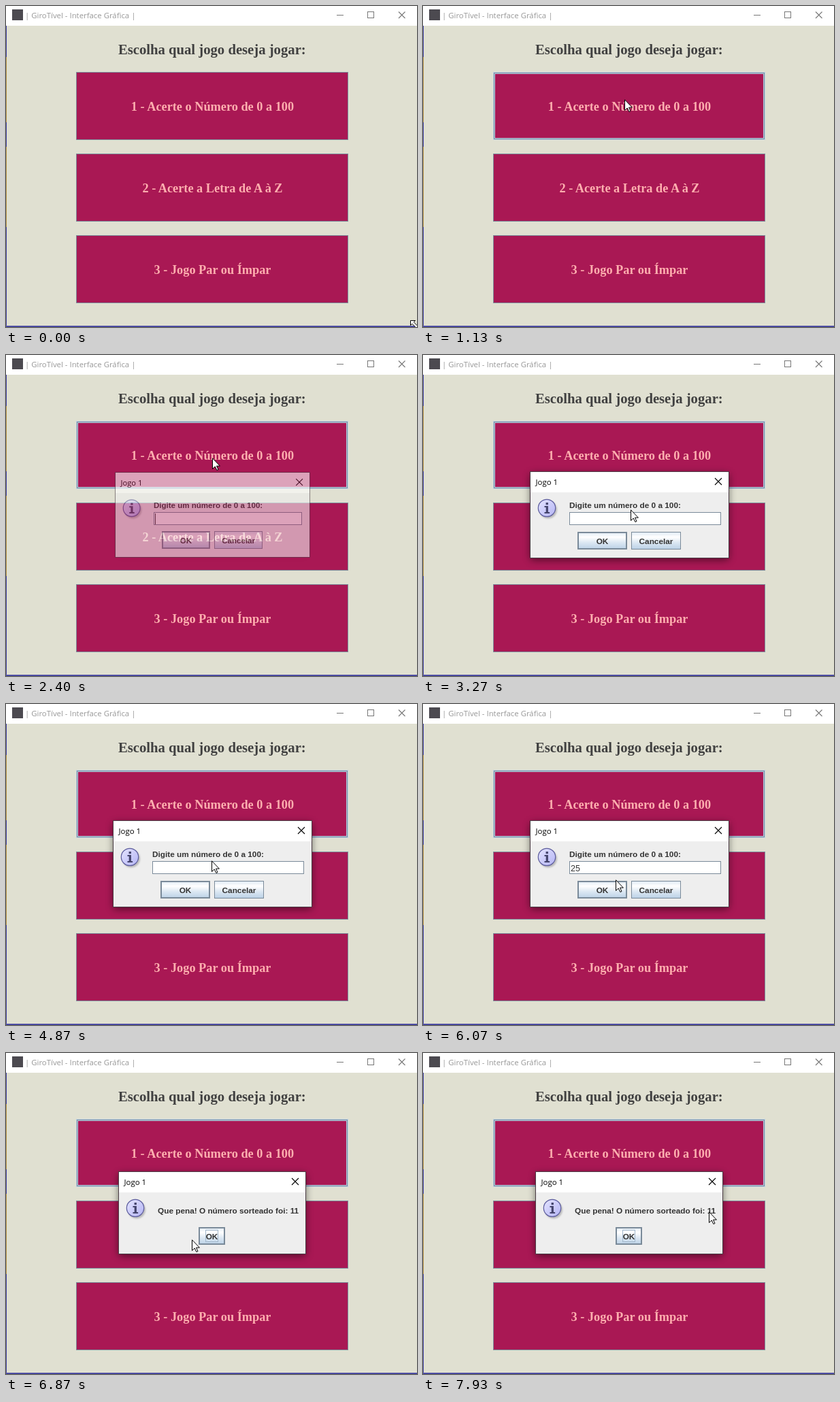
These frames come from a looping animation (604x472 px, 8000 ms). An HTML page:

```html
<!DOCTYPE html>
<html lang="pt">
<head>
<meta charset="utf-8">
<title>Interface Gráfica</title>
<style>
  html, body { margin: 0; width: 604px; height: 472px; overflow: hidden; }
  svg { display: block; }
  rect, .crisp { shape-rendering: crispEdges; }
  .ui { font-family: "Open Sans", "Noto Sans", sans-serif; font-size: 11.4px; }
  .menu { font: bold 18.3px "Liberation Serif", serif; fill: #ffafaf; text-anchor: middle; }
  .heading { font: bold 20.7px "Liberation Serif", serif; fill: #404040; text-anchor: middle; }
  .label { font: bold 11.8px "Liberation Sans", sans-serif; fill: #333; }
  .input { font: 12.5px "Liberation Sans", sans-serif; fill: #333; }
  .mid { text-anchor: middle; }
  .line { fill: none; }
</style>
</head>
<body>
<svg id="stage" width="604" height="472" viewBox="0 0 604 472"></svg>
<script>
const LOOP = 8000, TICK = 200 / 3;
const STEEL = '#7a8a99', SKY = '#b8cfe5', WINE = '#a91854';

const fill = (x, y, w, h, color, extra = '') =>
  `<rect x="${x}" y="${y}" width="${w}" height="${h}" fill="${color}" ${extra}/>`;
const frame = (x, y, w, h, color) =>
  `<rect x="${x + .5}" y="${y + .5}" width="${w - 1}" height="${h - 1}" fill="none" stroke="${color}"/>`;
const text = (x, y, cls, str, extra = '') =>
  `<text x="${x}" y="${y}" class="${cls}" ${extra}>${str}</text>`;
const cross = (x, y, size, color) =>
  `<path d="M${x} ${y}l${size} ${size}m0 ${-size}l${-size} ${size}" class="line" stroke="${color}" stroke-width="1.1"/>`;

function menuButton(label, i) {
  const x = 103, y = 97 + 120 * i;
  return `<g id="menu${i}">` + fill(x, y, 400, 100, WINE, 'class="face"') +
    text(303.5, y + 57, 'menu', label) +
    `<g class="normal">${frame(x, y, 400, 100, STEEL)}</g>` +
    `<g class="hover">${frame(x, y, 400, 100, SKY)}${frame(x + 1, y + 1, 398, 98, STEEL)}${frame(x + 2, y + 2, 396, 96, SKY)}</g>` +
    `<g class="pressed">${frame(x, y, 400, 100, STEEL)}${fill(x, y, 400, 2, STEEL)}${fill(x, y, 2, 100, STEEL)}</g></g>`;
}

function smallButton(x, y, w, label, isDefault, id = '') {
  return fill(x, y, w, 26, 'url(#ocean)', id && `id="${id}"`) + frame(x, y, w, 26, STEEL) +
    (isDefault ? frame(x + 1, y + 1, w - 2, 24, STEEL) : '') +
    text(x + w / 2, y + 18, 'label mid', label);
}

function infoIcon(x, y) {
  return `<circle cx="${x + 2}" cy="${y + 2.5}" r="13" fill="#888" opacity=".5" filter="url(#soft)"/>
    <circle cx="${x}" cy="${y}" r="12.7" fill="url(#orb)" stroke="#5c5c9c" stroke-width="1.2"/>
    <path d="M${x - 3.5} ${y - 3}h5.4v9h2.2v2h-7.6v-2h2.2v-7h-2.2zM${x - 1.4} ${y - 8}h3.3v3.3h-3.3z" fill="#44446c"/>`;
}

function dialog(id, x, y, w, h, body) {
  return `<g id="${id}"><rect class="shadow" x="${x}" y="${y + 3}" width="${w}" height="${h}" fill="#000" filter="url(#blur)"/>` +
    fill(x, y, w, h, '#eee') + fill(x, y, w, 30, '#fff') + frame(x - 1, y - 1, w + 2, h + 2, '#4b3d45') +
    text(x + 7.5, y + 19, 'ui', 'Jogo 1') + cross(x + w - 20, y + 9, 10, '#000') +
    infoIcon(x + 24, y + 53) + body + '</g>';
}

document.getElementById('stage').innerHTML = `
  <defs>
    <linearGradient id="ocean" x2="0" y2="1">
      <stop stop-color="#dde8f3"/><stop offset=".3" stop-color="#fff"/>
      <stop offset=".6" stop-color="#dde8f3"/><stop offset="1" stop-color="${SKY}"/>
    </linearGradient>
    <linearGradient id="orb" x2="1" y2="1">
      <stop stop-color="#e4e4ff"/><stop offset="1" stop-color="#b4b4f4"/>
    </linearGradient>
    <filter id="blur" x="-20%" y="-30%" width="140%" height="160%"><feGaussianBlur stdDeviation="6"/></filter>
    <filter id="soft" x="-30%" y="-30%" width="160%" height="160%"><feGaussianBlur stdDeviation="1.2"/></filter>
  </defs>` +
  fill(0, 0, 604, 472, '#e0e0d1') + fill(0, 0, 604, 29, '#fff') +
  fill(0, 29, 1, 443, '#3c3ca0') + fill(0, 75, 1, 96, '#b08c40') + fill(0, 207, 1, 118, '#b08c40') +
  fill(0, 470, 604, 1, '#6464a8') + fill(0, 471, 604, 1, '#3c3ca0') +
  fill(9, 5, 16, 16, '#4c4a50') +
  text(28, 18, 'ui', '| GiroTível - Interface Gráfica |', 'id="title"') +
  `<g id="idleControls">${controls('#777')}</g><g id="liveControls">${controls('#000')}</g>` +
  text(302.8, 71, 'heading', 'Escolha qual jogo deseja jogar:') +
  ['1 - Acerte o Número de 0 a 100', '2 - Acerte a Letra de A à Z', '3 - Jogo Par ou Ímpar'].map(menuButton).join('') +
  dialog('ask', 158, 172, 291, 126,
    text(215, 225, 'label', 'Digite um número de 0 a 100:') +
    fill(215, 231, 223, 19, '#fff') + frame(215, 231, 223, 19, STEEL) +
    text(217, 246, 'input', '', 'id="typed"') + fill(217, 233, 1, 16, '#333', 'id="caret"') +
    smallButton(227, 260, 73, 'OK', true, 'askOk') + smallButton(306, 260, 73, 'Cancelar', false)) +
  dialog('result', 166, 175, 274, 120,
    text(223, 236, 'label', 'Que pena! O número sorteado foi: 11') +
    smallButton(283, 256, 39, 'OK', true) + frame(293, 260, 19, 18, '#a3b8cc')) +
  `<path id="resize" d="M594.5 462.5h7l-2.3 2.3 7 7-2.4 2.4-7-7-2.3 2.3z" fill="#fff" stroke="#000"/>
   <path id="arrow" d="M.5 .8V16.5L4.2 13 6.9 18.5 9 17.5 6.5 12.2H11.4z" fill="#fff" stroke="#000"/>`;

function controls(color) {
  return fill(486, 13, 10, 1, color) + frame(531, 8, 10, 10, color) + cross(577, 8.5, 9.5, color);
}

const $ = id => document.getElementById(id);
const show = (el, on) => el.style.display = on ? '' : 'none';

// Each key is [time, ...values]; values are interpolated linearly.
const pointer = [
  [200, 596, 464], [330, 560, 438], [600, 440, 318], [870, 338, 218], [1070, 296, 162],
  [1130, 296, 137], [1200, 296, 131], [1270, 296, 129], [1400, 296, 129], [1670, 303, 151],
  [2730, 303, 151], [2930, 304, 180], [3130, 306, 218], [3270, 305, 227], [3530, 302, 230],
  [5800, 302, 230], [6070, 283, 258], [6330, 273, 274],
  [7270, 273, 274], [7470, 330, 262], [7730, 443, 245], [7930, 420, 233]
];
const askAlpha = [[2270, 0], [2330, .2], [2400, .6], [2470, .85], [2530, .95], [2600, 1], [6530, 1], [6600, .4], [6670, 0]];
const resultAlpha = [[6600, 0], [6670, .2], [6730, .6], [6800, .9], [6870, 1]];
const caretToggles = [2800, 3330, 3870, 4330, 4870, 4930, 5670, 6170];

function track(keys, t) {
  const next = keys.findIndex(k => k[0] > t);
  if (next === 0) return keys[0].slice(1);
  if (next < 0) return keys[keys.length - 1].slice(1);
  const a = keys[next - 1], b = keys[next], p = (t - a[0]) / (b[0] - a[0]);
  return a.slice(1).map((v, i) => v + (b[i + 1] - v) * p);
}

function fade(id, alpha, cx, cy) {
  const el = $(id), s = 1 - .055 * (1 - alpha);
  show(el, alpha > 0);
  el.setAttribute('opacity', alpha);
  el.setAttribute('transform', `translate(${cx} ${cy}) scale(${s}) translate(${-cx} ${-cy})`);
  el.querySelector('.shadow').setAttribute('opacity', .55 * alpha ** 6);
}

function render(t) {
  const [x, y] = track(pointer, t).map(Math.round);
  show($('resize'), t < 270);
  show($('arrow'), t >= 270);
  $('arrow').setAttribute('transform', `translate(${x} ${y})`);

  const active = t >= 2070 && t < 2330;
  $('title').setAttribute('fill', active ? '#000' : '#999');
  show($('liveControls'), active);
  show($('idleControls'), !active);

  for (let i = 0; i < 3; i++) {
    const top = 97 + 120 * i, el = $('menu' + i);
    const inside = t >= 2330 ? i === 0 : x >= 103 && x < 503 && y >= top && y < top + 100;
    const pressed = active && inside;
    show(el.querySelector('.pressed'), pressed);
    show(el.querySelector('.hover'), inside && !pressed);
    show(el.querySelector('.normal'), !inside);
    el.querySelector('.face').setAttribute('fill', pressed ? SKY : WINE);
  }

  fade('ask', track(askAlpha, t)[0], 303.5, 235);
  fade('result', track(resultAlpha, t)[0], 303, 235);

  const typed = '25'.slice(0, t >= 5130 ? 2 : t >= 4930 ? 1 : 0);
  $('typed').textContent = typed;
  $('caret').setAttribute('x', 217 + 7 * typed.length);
  show($('caret'), caretToggles.filter(k => k <= t).length % 2 === 0);
  $('askOk').setAttribute('fill', t >= 6530 ? SKY : 'url(#ocean)');
}

const start = performance.now();
function loop() {
  const t = (performance.now() - start) % LOOP;
  // The screen refreshes on a coarse clock, so motion advances in ticks.
  render(Math.round(Math.floor(t / TICK + .1) * TICK / 10) * 10 % LOOP);
  requestAnimationFrame(loop);
}
loop();
</script>
</body>
</html>
```
